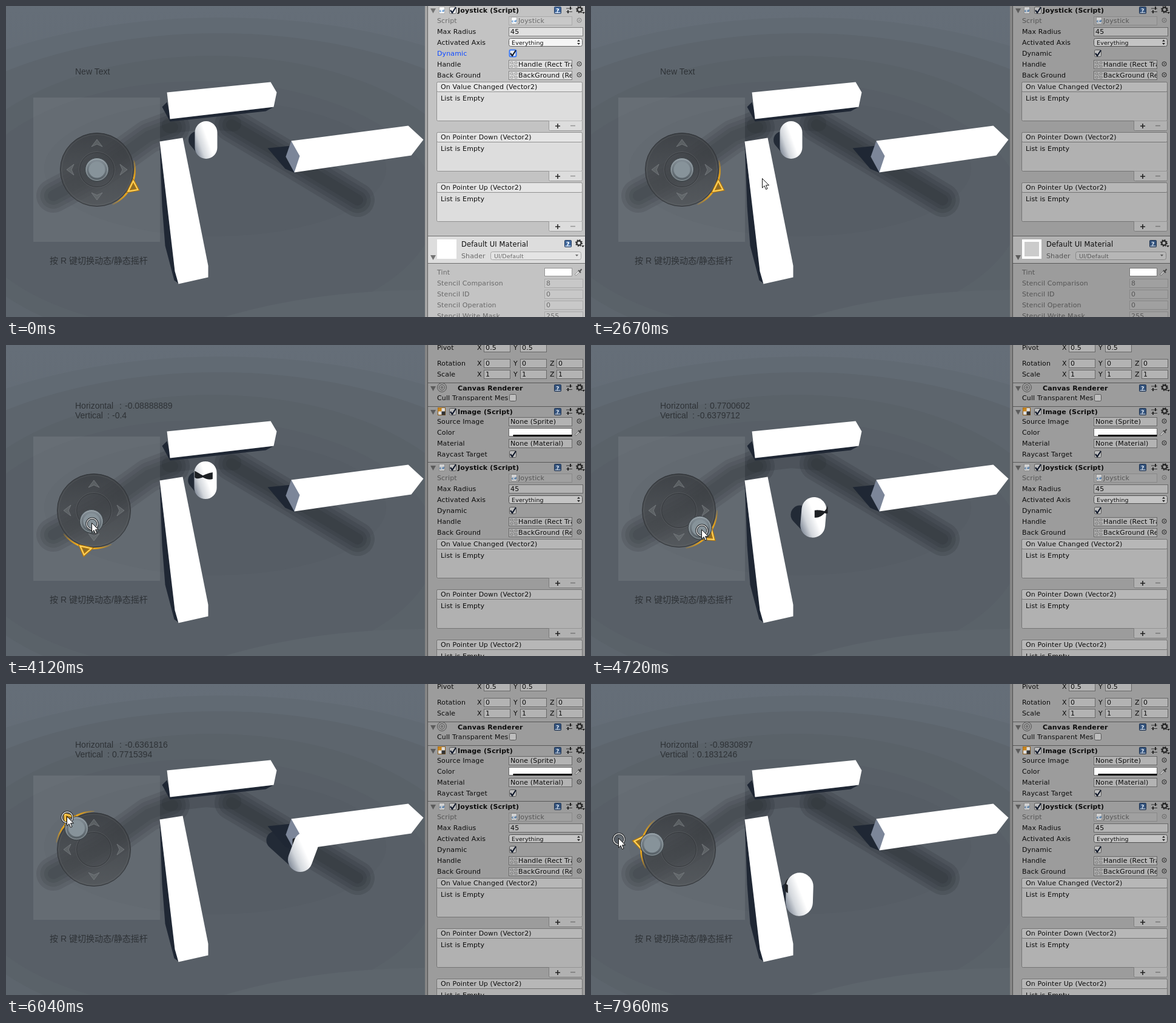
An HTML page for the animation above (8 s loop, 955 px wide and 513 px high).

```html
<!DOCTYPE html>
<html lang="zh-CN">
<head>
<meta charset="utf-8">
<title>Joystick demo</title>
<style>
  html, body { margin: 0; width: 100%; height: 100%; overflow: hidden; background: #596067; }
  svg { display: block; }
  text { white-space: pre; }
  .ui { font: 14px "Liberation Sans", "Noto Sans CJK SC", "Noto Sans CJK", sans-serif; fill: #2e3236; }
  #panel text { font-family: "DejaVu Sans", sans-serif; font-size: 11px; letter-spacing: .13px; fill: #0c0c0c; }
  #panel text.dim { fill: #555; }
  #panel text.bold { font-weight: bold; }
  #panel text.small { font-size: 9.5px; }
  #panel.fresh { filter: brightness(1.25); }
  #panel.fresh #dynamic { fill: #0a3bd0; }
  #panel.fresh #dynamicBox { stroke: #2f62c8; stroke-width: 2; }
  #panel.fresh #thumbInner { fill: #fff; }
</style>
</head>
<body>
<svg id="stage" width="955" height="513" viewBox="0 0 955 513">
  <defs>
    <linearGradient id="ground" x2="0" y2="1">
      <stop offset="0" stop-color="#656e78"/><stop offset="1" stop-color="#5e666e"/>
    </linearGradient>
    <linearGradient id="pad" x2="0" y2="1">
      <stop offset="0" stop-color="#36393d" stop-opacity=".8"/><stop offset="1" stop-color="#4c4f52" stop-opacity=".66"/>
    </linearGradient>
    <linearGradient id="knob" x2="0" y2="1">
      <stop offset="0" stop-color="#87929a"/><stop offset="1" stop-color="#535c62"/>
    </linearGradient>
    <linearGradient id="skin" x1="0" y1=".8" x2=".75" y2=".35">
      <stop offset="0" stop-color="#7f8896"/><stop offset=".35" stop-color="#d3d7dc"/><stop offset=".75" stop-color="#fff"/>
    </linearGradient>
    <linearGradient id="gold" gradientUnits="userSpaceOnUse" x1="0" y1="-42" x2="0" y2="42">
      <stop offset="0" stop-color="#d8940f" stop-opacity=".2"/><stop offset=".3" stop-color="#e2a01a"/>
      <stop offset=".5" stop-color="#ffd96a"/><stop offset=".7" stop-color="#e2a01a"/>
      <stop offset="1" stop-color="#d8940f" stop-opacity=".2"/>
    </linearGradient>
  </defs>

  <rect width="692" height="513" fill="url(#ground)"/>
  <ellipse cx="355" cy="335" rx="640" ry="316" fill="#616a73"/>
  <ellipse cx="350" cy="330" rx="560" ry="285" fill="#5d656d"/>
  <ellipse cx="340" cy="325" rx="440" ry="243" fill="#5a6269"/>
  <ellipse cx="320" cy="330" rx="390" ry="206" fill="#585f67"/>
  <path d="M360 513Q500 470 692 468V513Z" fill="#5d656c"/>
  <ellipse cx="345" cy="268" rx="282" ry="112" fill="#565d65"/>
  <g id="blots" fill="none" stroke="#24282d" stroke-opacity=".18" stroke-linecap="round" stroke-linejoin="round"></g>

  <path id="heroShadow" stroke="#222a36" stroke-linecap="round"/>
  <g transform="translate(.5 .5)">
    <g fill="#1f2734">
      <path d="M257 166L265 158L272 186L441 166L428 173L300 187L270 190Z"/>
      <path d="M431 234L470 230L461 249L476 275L460 268Z"/>
      <path d="M253 224L257 330L262 395L277 452L284 457L279 437Z"/>
    </g>
    <g fill="#fff">
      <path d="M265 142L436 125L446 142L441 166L270 186Z"/>
      <path d="M470 222L663 197L688 220L668 246L475 274Z"/>
      <path d="M253 223L291 217L333 428L333 447L284 458L278 437Z"/>
    </g>
    <path d="M470 222L484 247L475 274L461 248Z" fill="#7c8699"/>
  </g>

  <path id="maskBack" fill="#1d2024"/>
  <path id="body" fill="url(#skin)"/>
  <path id="maskFront" fill="#1d2024"/>

  <rect x="45" y="151" width="209" height="238" fill="#fff" fill-opacity=".08"/>
  <g id="stick">
    <circle r="60.5" fill="url(#pad)" stroke="#303337"/>
    <circle r="58" fill="none" stroke="#777b7e" stroke-opacity=".25"/>
    <circle r="28.5" fill="none" stroke="#34373b"/>
    <circle r="29.5" fill="none" stroke="#7b7f82" stroke-opacity=".3"/>
    <g id="arrows" fill="#72777a" fill-opacity=".5" stroke="#8b9093" stroke-opacity=".5"></g>
    <g id="glow">
      <path d="M48.3 -40.5A63 63 0 0 1 48.3 40.5A67 67 0 0 0 48.3 -40.5Z" fill="url(#gold)" stroke="url(#gold)" stroke-width="1.8"/>
      <path d="M62 -9.5L75 0L62 9.5Z" fill="#8a6c2c" stroke="#b87a0b" stroke-width="4.5"/>
      <path d="M62 -9.5L75 0L62 9.5Z" fill="none" stroke="#ffd560" stroke-width="2"/>
    </g>
    <g id="handle">
      <circle r="19.5" fill="url(#knob)" stroke="#3d4347"/>
      <circle r="17.5" fill="none" stroke="#b4bdc1" stroke-opacity=".65"/>
      <circle r="13.5" fill="#87939a"/>
    </g>
  </g>

  <text class="ui" id="label" x="114" y="113">New Text</text>
  <g class="ui" id="readout">
    <text x="114" y="105">Horizontal</text><text x="187" y="105">:</text><text id="horizontal" x="196" y="105"></text>
    <text x="114" y="121">Vertical</text><text x="167" y="121">:</text><text id="vertical" x="175" y="121"></text>
  </g>
  <text class="ui" x="72" y="425">按 R 键切换动态/静态摇杆</text>

  <g id="panel">
    <rect x="691" width="264" height="513" fill="#9c9c9c"/>
    <rect x="691" width="5" height="513" fill="#858585"/>
    <rect x="695" width="1" height="513" fill="#4c4c4c"/>
    <g id="content"></g>
  </g>

  <g id="cursor">
    <g id="ring" fill="none">
      <circle cx="1" cy="2" r="9" stroke="#25282b" stroke-width="3.4"/>
      <circle cx="1" cy="2" r="9" stroke="#e4e4e4" stroke-width="1.4"/>
    </g>
    <path d="M.5 .5V16L4 12.6L6.6 18.5L9 17.4L6.5 11.7H11.5Z" fill="#fff" stroke="#111"/>
  </g>
</svg>
<script>
const $ = id => document.getElementById(id);
const set = (id, attrs) => { for (const k in attrs) $(id).setAttribute(k, attrs[k]); };

// ---- inspector ----
const rect = (x, y, w, h, fill, stroke = 'none', extra = '') =>
  `<rect x="${x + .5}" y="${y + .5}" width="${w}" height="${h}" fill="${fill}" stroke="${stroke}" ${extra}/>`;
const text = (x, mid, str, cls = '', extra = '') =>
  `<text x="${x}" y="${mid + 4}" class="${cls}" ${extra}>${str}</text>`;
const path = (d, stroke, width = 1, fill = 'none') =>
  `<path d="${d}" stroke="${stroke}" stroke-width="${width}" fill="${fill}"/>`;
const circle = (x, y, r, stroke, fill = 'none') => `<circle cx="${x}" cy="${y}" r="${r}" stroke="${stroke}" fill="${fill}"/>`;
const line = y => path(`M696 ${y + .5}H955`, '#585858');
const box = (x, y, w, str, dim, pad = 2) => rect(x, y - 7, w, 14, dim ? '#a0a0a0' : '#b3b3b3', dim ? '#888' : '#686868') +
  `<svg x="${x + 1}" y="${y - 7}" width="${w - 1}" height="15">${text(pad, 7, str, dim ? 'dim' : '')}</svg>`;
const check = (y, on = true, x = 830, extra = '') => rect(x, y - 6, 11, 11, '#bdbdbd', '#555', 'rx="2" ' + extra) +
  (on ? path(`M${x + 2} ${y}l3 4l6 -9`, '#10182a', 2.2) : '');
const fold = y => path(`M700 ${y - 3}h9l-4.5 8Z`, 'none', 0, '#5c5c5c');
const picker = (y, color = '#222') => circle(945.5, y - .5, 3.5, color) + circle(945.5, y - .5, 1, 'none', color);
const gear = (x, y) => `<circle cx="${x}" cy="${y}" r="3.6" fill="none" stroke="#222" stroke-width="2.2"/>` +
  `<circle cx="${x}" cy="${y}" r="5.2" fill="none" stroke="#222" stroke-width="1.6" stroke-dasharray="2 2.08"/>` +
  path(`M${x + 4} ${y + 4}h5l-2.5 3Z`, 'none', 0, '#222');
const help = (x, y) => rect(x, y - 6, 11, 11, '#34537d', '#1d304c', 'rx="1"') +
  text(x + 3, y, '?', 'small bold', 'style="fill:#dfe8f2"') + path(`M${x + 1.5} ${y + 4}h9`, '#dde3ea');
const tools = y => help(904, y) + path(`M924 ${y - 3}h10M924 ${y + 2.5}h10`, '#333') +
  path(`M931 ${y - 6}v5M927 ${y}v5`, '#222', 2) + gear(946, y - 1);
const dropper = y => path(`M939 ${y + 5}l7 -7`, '#666', 3) + path(`M939.5 ${y + 4.5}l6.5 -6.5`, '#ddd', 1.4) +
  path(`M944 ${y - 3}l4 4M946 ${y - 1}l3.5 -4`, '#444', 2);
const scriptIcon = (x, y) => rect(x - 5, y - 6, 9, 11, '#d2d2d2', '#8b8b8b') +
  `<text x="${x - 4}" y="${y + 3}" class="bold" style="font-size:6px;fill:#36679b">c#</text>`;
const header = (y, title, icon) => line(y - 9) + fold(y) + icon + text(745, y, title, 'bold') + tools(y);
const field = (y, label, str) => text(711, y, label) + box(829, y, 104, str) + picker(y);
const slot = (y, label, str) => text(711, y, label) + box(829, y, 104, str, false, 15) + picker(y) +
  path(`M832 ${y - 4}h4v3h-4zM839 ${y - 4}h4v3h-4zM832 ${y + 2}h4v3h-4zM839 ${y + 2}h4v3h-4zM836 ${y - 1}l3 3`, '#777');
const triple = (y, label, value, count = 3) => text(711, y, label) + [...'XYZ'].slice(0, count).map((axis, i) =>
  text(777 + 60 * i, y, axis) + box(788 + 60 * i, y, 43, value)).join('');
const eventList = (title, i) => {
  const y = 125 + 83 * i;
  return rect(710, y, 240, 64, '#b1b1b1', '#747474', 'rx="2"') + rect(710, y, 240, 16, '#b7b7b7', '#747474', 'rx="2"') +
    text(717, y + 8, `On ${title} (Vector2)`) + text(717, y + 27, 'List is Empty') +
    path(`M895.5 ${y + 64.5}v14q0 2 2 2h51q2 0 2 -2v-14`, '#7c7c7c', 1, '#b1b1b1') +
    path(`M906 ${y + 73}h8M910 ${y + 69}v8`, '#222', 1.6) + path(`M931 ${y + 72.5}h8`, '#777', 1.5);
};
const stencil = (label, i) => text(711, 457 + 18 * i, 'Stencil ' + label, 'dim') +
  box(888, 457 + 18 * i, 63, [8, 0, 0, 255][i], true);

$('content').innerHTML = [
  triple(-191, 'Pivot', '0.5', 2), triple(-165, 'Rotation', 0), triple(-147, 'Scale', 1),
  header(-124, 'Canvas Renderer', [7.5, 4.5, 1.5].map(r => circle(719, -125, r, '#555')).join('')),
  `<svg x="711" y="-116" width="118" height="16">${text(0, 8, 'Cull Transparent Mesh')}</svg>`, check(-108, false),
  header(-85, 'Image (Script)', rect(712, -92, 12, 12, '#ddd', '#8b5a16') + rect(712, -92, 6, 6, '#c9851c') +
    rect(718, -86, 6, 6, '#333') + check(-85, true, 731)),
  field(-69, 'Source Image', 'None (Sprite)'),
  text(711, -51, 'Color'), rect(829, -58, 104, 13, '#fff', '#686868'), rect(836, -47.5, 97, 3, '#000'), dropper(-51),
  field(-33, 'Material', 'None (Material)'),
  text(711, -15, 'Raycast Target'), check(-15),
  header(7, 'Joystick (Script)', scriptIcon(719, 7) + check(7, true, 731)),
  text(711, 24, 'Script', 'dim'), box(829, 24, 104, 'Joystick', true, 15), scriptIcon(838, 24), picker(24, '#666'),
  text(711, 42, 'Max Radius'), box(829, 42, 122, '45'),
  text(711, 60, 'Activated Axis'), rect(829, 53, 121, 13, '#c4c4c4', '#505050', 'rx="3"'),
  text(834, 59.5, 'Everything', 'small'), path('M942 58.5h5l-2.5 -3ZM942 61h5l-2.5 3Z', 'none', 0, '#222'),
  text(711, 78, 'Dynamic', '', 'id="dynamic"'), check(78, true, 830, 'id="dynamicBox"'),
  slot(96, 'Handle', 'Handle (Rect Transform)'), slot(114, 'Back Ground', 'BackGround (Rect Transform)'),
  ...['Value Changed', 'Pointer Down', 'Pointer Up'].map(eventList),
  rect(695.5, 379.5, 260, 44, '#b1b1b1'), line(379), line(424), fold(414),
  rect(710.5, 384.5, 32, 32, '#fff'), rect(714.5, 388.5, 24, 24, '#cbcbcb', 'none', 'id="thumbInner"'),
  text(751, 392.5, 'Default UI Material', '', 'style="font-size:11.5px"'), help(921, 392), gear(945, 391),
  text(751, 411.5, 'Shader', 'dim'), rect(799, 405, 149, 13, '#b6b6b6', '#858585', 'rx="3"'),
  text(805, 411.5, 'UI/Default', 'small dim'), path('M939 410h5l-2.5 3Z', 'none', 0, '#555'),
  text(711, 439, 'Tint', 'dim'), rect(888, 432, 45, 13, '#fff', '#777'), dropper(439),
  ...['Comparison', 'ID', 'Operation', 'Write Mask'].map(stencil)
].join('');

$('blots').innerHTML = [56, 43, 30, 18].map(w =>
  `<path stroke-width="${w}" d="M78 313L155 272L235 215L275 200M372 196L470 254L580 320"/>`).join('') +
  '<path stroke-width="26" d="M270 197L330 190L375 194"/>';
$('arrows').innerHTML = [0, 1, 2, 3].map(i => `<path transform="rotate(${90 * i})" d="M38 -9L50 0L38 9L42 0Z"/>`).join('');

// ---- motion ----
const LOOP = 8000, STEP = 120, GRAB = 3880;
const phases = [0, 620, 1830, 3040];            // the picture steps evenly from each of these
const center = { x: 145, y: 273 };

// time, x, y
const hover = [[620, 648, 39], [1340, 421, 330], [1830, 421, 350], [2430, 271, 291], [2670, 282, 284],
  [2790, 171, 252], [2920, 171, 252], [3280, 760, 270], [GRAB, 144, 271]];

// time, stick direction, pointer reach, hero position
const drag = [
  { t: 4120, h: -.08888889, v: -.4, reach: 20, x: 329, y: 223 },
  { t: 5200, h: .9827106, v: .1851484, reach: 71, x: 434, y: 309 },
  { t: 6040, h: -.6361815, v: .7715393, reach: 71, x: 490, y: 277 },
  { t: 7120, h: -.7607325, v: -.6490654, reach: 143, x: 330, y: 295 },
  { t: 7960, h: -.9830898, v: .1831246, reach: 102, x: 343, y: 347 }];

const mix = (a, b, u) => a + (b - a) * u;
const clamp = v => Math.min(1, Math.max(0, v));

function span(keys, t, time) {
  let i = 0;
  while (i < keys.length - 2 && time(keys[i + 1]) <= t) i++;
  const a = keys[i], b = keys[i + 1];
  return [a, b, clamp((t - time(a)) / (time(b) - time(a)))];
}

// Curve between two points, leaving and arriving at the given velocities.
const hermite = (p, v, q, w, u) =>
  p + (3 * (q - p) - 2 * v - w) * u * u + (2 * (p - q) + v + w) * u ** 3 + v * u;

const heroRadius = y => 18.5 + (y - 221) * .031;

function dragState(t) {
  const [a, b, u] = span(drag, t, k => k.t);
  const from = Math.atan2(a.v, a.h);
  let turn = Math.atan2(b.v, b.h) - from;
  turn -= 2 * Math.PI * Math.round(turn / (2 * Math.PI));
  const angle = from + turn * u;
  const size = Math.min(1, Math.hypot(drag[0].h, drag[0].v) * (t - GRAB) / (drag[0].t - GRAB));
  const h = size * Math.cos(angle), v = size * Math.sin(angle);

  // The hero runs where the stick points and slides along the left wall.
  const pace = .15 * (b.t - a.t);
  const y = hermite(a.y, -a.v * pace, b.y, -b.v * pace, u);
  const wall = 291 + (y - 217) * .2 + 1.2 * heroRadius(y);
  const x = Math.max(wall, hermite(a.x, a.h * pace, b.x, b.h * pace, u));

  const reach = mix(a.reach, b.reach, u) * clamp((t - GRAB) / (drag[0].t - GRAB));
  const pointer = [center.x + reach * Math.cos(angle), center.y - reach * Math.sin(angle)];
  return { angle, facing: angle, h, v, x, y, pointer };
}

function idleState(t) {
  const [a, b, u] = span(hover, t, k => k[0]);
  return { angle: -.454, facing: Math.PI / 2, h: 0, v: 0, x: 330, y: 221,
    pointer: [mix(a[1], b[1], u), mix(a[2], b[2], u)] };
}

// Eye band around the head, kept where it lies on the near side of `limit`.
function mask(cx, cy, r, facing, limit) {
  const top = [], bottom = [];
  for (let p = -.84; p <= .85; p += .105) {
    const a = facing + p;
    if (Math.sin(a) > limit) continue;
    const x = cx + r * 1.1 * Math.cos(a), y = cy - r * .4 * Math.sin(a);
    const half = r * (.08 + .22 * Math.abs(Math.sin(p * 2.2)));
    top.push(`${x} ${y - half}`);
    bottom.unshift(`${x} ${y + half}`);
  }
  return top.length ? `M${top.concat(bottom).join('L')}Z` : '';
}

function drawHero({ x, y, facing }) {
  const r = heroRadius(y), half = 31 + (y - 221) * .037 - r;
  const dx = x - 330, lean = dx * .03, len = Math.hypot(lean, half);
  const nx = half / len * r, ny = lean / len * r;
  const [hx, hy, bx, by] = [x + lean, y - half, x - lean, y + half];
  set('body', { d: `M${hx - nx} ${hy - ny}A${r} ${r} 0 0 1 ${hx + nx} ${hy + ny}` +
    `L${bx + nx} ${by + ny}A${r} ${r} 0 0 1 ${bx - nx} ${by - ny}Z` });
  set('maskBack', { d: mask(hx, hy - 1, r, facing, 2) });
  set('maskFront', { d: mask(hx, hy - 1, r, facing, .12) });
  set('heroShadow', { d: `M${bx - 2} ${by + 3}L${x - 15 - dx * .19} ${y - dx * .12}`, 'stroke-width': r * 1.5 });
}

const show = (id, on) => set(id, { visibility: on ? 'visible' : 'hidden' });
const number = v => String(parseFloat(v.toPrecision(7)));

function draw(time) {
  const start = phases.filter(p => p <= time).pop();
  const t = start + Math.floor((time - start) / STEP) * STEP;
  const dragging = t >= GRAB;
  const state = dragging ? dragState(t) : idleState(t);

  drawHero(state);
  set('stick', { transform: dragging ? `translate(${center.x} ${center.y})` : 'translate(150 270)' });
  set('glow', { transform: `rotate(${-state.angle * 180 / Math.PI})` });
  set('handle', { transform: `translate(${45 * state.h} ${-45 * state.v})` });
  show('label', !dragging);
  show('readout', dragging);
  $('horizontal').textContent = number(state.h);
  $('vertical').textContent = number(state.v);

  set('content', { transform: `translate(0 ${195 * clamp((t - 3160) / 360)})` });
  $('panel').classList.toggle('fresh', t < STEP);

  show('cursor', t >= hover[0][0]);
  set('ring', { display: dragging ? 'inline' : 'none' });
  set('cursor', { transform: `translate(${state.pointer.map(Math.round).join(' ')})` });
}

const origin = performance.now();
function tick() {
  draw((performance.now() - origin) % LOOP);
  requestAnimationFrame(tick);
}
tick();
</script>
</body>
</html>
```
